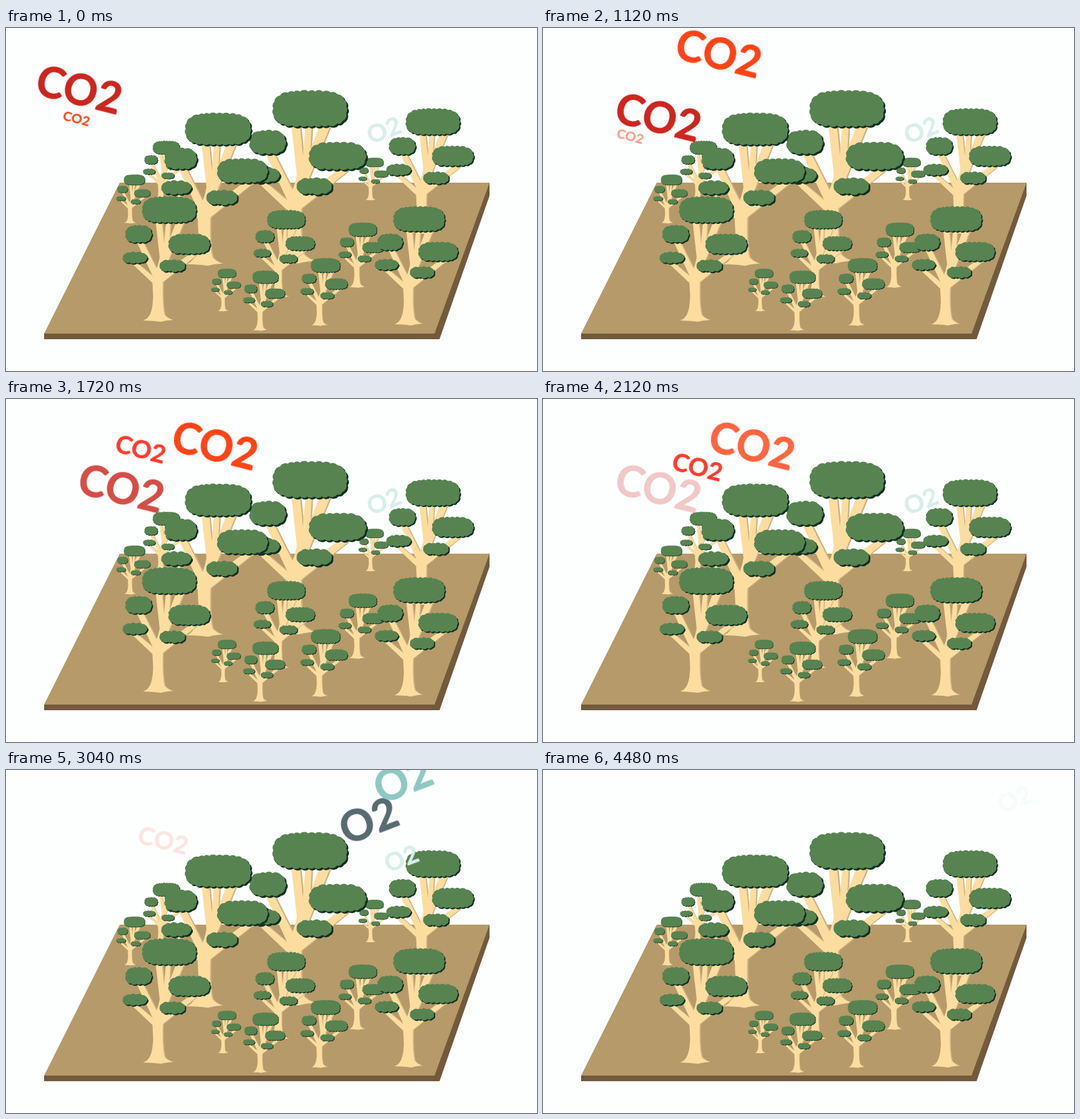
Animation of 850x550 px, one loop 4800 ms. Source, as an HTML page:

```html
<!DOCTYPE html>
<html lang="en">
<head>
<meta charset="utf-8">
<title>Trees turning CO2 into O2</title>
<style>
  html, body { margin: 0; width: 100%; height: 100%; overflow: hidden; background: #fdffff; }
  svg { display: block; width: 850px; height: 550px; }
  text { font-family: Lato, sans-serif; font-weight: 700; text-anchor: middle; stroke-width: .015em; }
</style>
</head>
<body>
<svg viewBox="0 0 850 550">
  <defs>
    <path id="wood"/>
    <g id="tree">
      <use href="#wood" x="1.8" fill="#cfb182"/>
      <use href="#wood" fill="#fcdd9f"/>
    </g>
  </defs>
  <path fill="#735a3d" d="M774 248V269L694 499H61V490Z"/>
  <path fill="#b69a69" d="M182 248H774L686 490H61Z"/>
  <g id="forest"></g>
  <g id="labels"></g>
</svg>
<script>
const LOOP = 4800;
const NS = 'http://www.w3.org/2000/svg';
const $ = id => document.getElementById(id);

function make(tag, attrs) {
  const el = document.createElementNS(NS, tag);
  for (const key in attrs) el.setAttribute(key, attrs[key]);
  return el;
}
const add = (parent, tag, attrs) => parent.appendChild(make(tag, attrs));

let seed = 7;
const random = () => (seed = seed * 16807 % 2147483647) / 2147483647;

// Straight branch that narrows from width w0 to w1.
function limb(x0, y0, w0, x1, y1, w1) {
  const len = Math.hypot(x1 - x0, y1 - y0) * 2;
  const nx = (y0 - y1) / len, ny = (x1 - x0) / len;
  const corner = (x, y, w) => `${x + nx * w} ${y + ny * w}`;
  return `M${corner(x0, y0, -w0)}L${corner(x1, y1, -w1)}L${corner(x1, y1, w1)}L${corner(x0, y0, w0)}Z`;
}

const power = (v, p) => Math.sign(v) * Math.abs(v) ** p;

// Scalloped cloud: uneven arcs strung along a domed superellipse with a flat base.
function cloud(w, h) {
  const a = w / 2 - 1.8, b = h / 2 - 2.2;
  let outline = '';
  for (let i = 0; i <= 120; i++) {
    const t = Math.PI * (1 + i / 60), s = Math.sin(t);
    outline += `${i ? 'L' : 'M'}${a * power(Math.cos(t), .6)} ${b * power(s, s < 0 ? .75 : .5)}`;
  }
  const edge = make('path', { d: outline });
  const length = edge.getTotalLength();
  const n = Math.round(length / 8.5);
  let d = '', last;
  for (let i = 0; i <= n; i++) {
    const jitter = i % n ? (random() - .5) * .5 : 0;
    const p = edge.getPointAtLength(length * (i + jitter) / n);
    const r = last && Math.hypot(p.x - last.x, p.y - last.y) * .75;
    d += `${last ? `A${r} ${r} 0 0 1 ` : 'M'}${p.x} ${p.y}`;
    last = p;
  }
  return d + 'Z';
}

const trunk = 'M-23-1C-11-4-7-18-6.5-40L-8-70Q4-90 5-112L20-108Q10-80 9-60Q8-25 12-10Q17-4 25-2Q12-1 6 1Q-10-1-23-1Z';
$('wood').setAttribute('d', trunk
  + limb(9, -98, 9, 2, -165, 10)
  + limb(14, -106, 9, 18, -165, 7)
  + limb(12, -96, 10, 39, -165, 12)
  + limb(1, -68, 11, -31, -134, 9)
  + limb(-2, -62, 9, -40, -96, 6)
  + limb(2, -64, 11, 62, -110, 8));

// x, y, width, height
const leaves = [
  [-29, -139, 44, 30], [-35, -101, 42, 20], [52, -123, 68, 34],
  [25, -88, 44, 21], [20, -178, 88, 44]
];
for (const [x, y, w, h] of leaves) {
  const d = cloud(w, h);
  add($('tree'), 'path', { d, fill: '#112f20', transform: `translate(${x + 1} ${y + 1})` });
  add($('tree'), 'path', { d, fill: '#578351', transform: `translate(${x - .9} ${y - .9})` });
}

// foot x, foot y, scale; back to front
const trees = [
  [583, 276, .34], [247, 281, .5], [198, 313, .39], [664, 329, 1], [460, 376, 1.38],
  [316, 380, 1.22], [561, 416, .52], [435, 432, .7], [347, 454, .34], [242, 470, 1],
  [643, 476, .95], [501, 477, .54], [406, 485, .48]
];
for (const [x, y, s] of trees)
  add($('forest'), 'use', { href: '#tree', transform: `translate(${x} ${y}) scale(${s})` });

// Each label appears at "from", drifts "by" an offset starting at "at", then fades.
const BIG = 68, MID = 40, SMALL = 21.5;
const labels = [
  { text: 'CO2', size: BIG, fill: '#cc261f', from: [117, 100], by: [67.5, 44.5], at: 0, travel: 900, fade: 1600 },
  { text: 'CO2', size: SMALL, fill: '#ff4a1c', from: [112.5, 145.5], by: [27, 28.5], at: 0, fade: 800 },
  { text: 'CO2', size: BIG, fill: '#ff4416', from: [281, 42], by: [53.5, 34], at: 1120, fade: 2000 },
  { text: 'CO2', size: MID, fill: '#ff3b2e', from: [215.5, 80.5], by: [36, 32.5], at: 1720, fade: 2440 },
  { text: 'O2', size: BIG, fill: '#53666b', from: [547.5, 136], by: [33.5, -53.5], at: 2240, travel: 700, fade: 3020 },
  { text: 'O2', size: BIG, fill: '#8fc7c3', from: [636, 33], by: [0, -37.5], at: 2800, fade: 3200 },
  { text: 'O2', size: MID, fill: '#d7eee9', from: [605, 164], by: [150, -117], at: 2840, travel: 1080, fade: 3540, early: true, rest: .2 },
  { text: 'O2', size: SMALL, fill: '#a9d0cd', from: [584, 185], by: [26, -58], at: 3360, fade: 3400 }
];

const pct = ms => (ms / LOOP * 100).toFixed(3) + '%';
const FADE = 700, LEAD = 10;
let css = '';

labels.forEach(({ text, size, fill, from: [x, y], by: [dx, dy], at, travel = 560, fade, early, rest = 0 }, i) => {
  const carbon = text === 'CO2';
  const pose = (px, py) => `transform: translate(${px}px, ${py}px) rotate(${carbon ? 14 : -21}deg)`;
  const show = early ? 0 : Math.max(0, at - LEAD);
  css += `
    @keyframes move${i} {
      0%, ${pct(at)} { ${pose(x, y)}; animation-timing-function: ${carbon ? 'ease-out' : 'linear'} }
      ${pct(at + travel)}, 100% { ${pose(x + dx, y + dy)} }
    }
    @keyframes fade${i} {
      ${show ? `0%, ${pct(show - .1)} { opacity: 0 }` : ''}
      ${pct(show)}, ${pct(fade)} { opacity: 1 }
      ${pct(fade + FADE)}, 100% { opacity: ${rest} }
    }`;
  const g = add($('labels'), 'g', {
    style: `animation: move${i} ${LOOP}ms infinite, fade${i} ${LOOP}ms linear infinite`
  });
  add(g, 'text', { y: size * .345, 'font-size': size, fill, stroke: fill }).textContent = text;
});
document.head.appendChild(document.createElement('style')).textContent = css;
</script>
</body>
</html>
```
